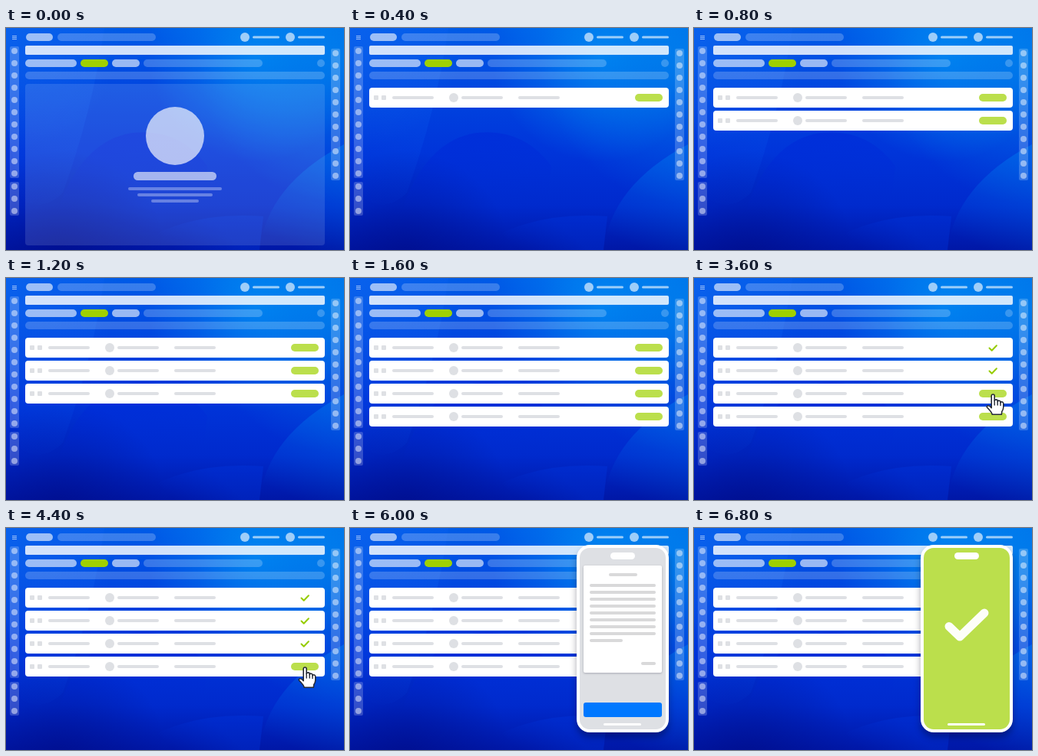
Recreate the animation shown at these times as an HTML page with a canvas. Size 440 px wide and 290 px high, loop 8.8 s.

```html
<!DOCTYPE html>
<html lang="en">
<head>
<meta charset="utf-8">
<style>
  html, body { margin: 0; width: 100%; height: 100%; overflow: hidden; background: #0034da; }
  canvas { display: block; width: 440px; height: 290px; }
</style>
</head>
<body>
<canvas id="stage" width="440" height="290"></canvas>
<script>
const stage = document.getElementById('stage');
const ctx = stage.getContext('2d');
const LOOP = 8800, STEP = 400;
const GREY = '#dee0e4', LIME = '#bbdf4c';
const white = a => `rgba(255,255,255,${a})`;

function box(x, y, w, h, r, fill, c = ctx) {
  c.fillStyle = fill;
  c.beginPath();
  c.roundRect(x, y, w, h, r);
  c.fill();
}
const pill = (x, y, w, h, fill, c) => box(x, y, w, h, h / 2, fill, c);

function dot(x, y, r, fill, c = ctx) {
  c.fillStyle = fill;
  c.beginPath();
  c.arc(x, y, r, 0, Math.PI * 2);
  c.fill();
}

function strokePath(d, color, width) {
  ctx.strokeStyle = color;
  ctx.lineWidth = width;
  ctx.lineCap = ctx.lineJoin = 'round';
  ctx.stroke(new Path2D(d));
}

function withShadow(blur, offset, alpha, draw) {
  ctx.save();
  ctx.shadowColor = `rgba(0,0,30,${alpha})`;
  ctx.shadowBlur = blur;
  ctx.shadowOffsetY = offset;
  draw();
  ctx.restore();
}

function paintWallpaper(c) {
  const base = c.createLinearGradient(0, 0, 0, 290);
  [[0, '#005be7'], [.3, '#0044df'], [.55, '#0035da'], [.8, '#002acd'], [1, '#0017a6']]
    .forEach(([at, color]) => base.addColorStop(at, color));
  c.fillStyle = base;
  c.fillRect(0, 0, 440, 290);

  const glow = (x, y, r, rgb, a) => {
    const g = c.createRadialGradient(x, y, 0, x, y, r);
    g.addColorStop(0, `rgba(${rgb},${a})`);
    g.addColorStop(1, `rgba(${rgb},0)`);
    c.fillStyle = g;
    c.fillRect(0, 0, 440, 290);
  };
  const sweep = (d, x0, y0, x1, y1, rgb, a) => {
    const g = c.createLinearGradient(x0, y0, x1, y1);
    g.addColorStop(0, `rgba(${rgb},${a})`);
    g.addColorStop(1, `rgba(${rgb},0)`);
    c.fillStyle = g;
    c.fill(new Path2D(d));
  };
  glow(0, 10, 150, '20,110,240', .4);
  glow(325, 35, 140, '0,155,248', .6);
  glow(440, 40, 190, '0,150,240', .55);
  glow(70, 300, 140, '0,8,125', .5);
  sweep('M128 0Q112 110 74 215Q50 240 20 225L0 120V0Z', 90, 60, 10, 230, '10,95,240', .3);
  sweep('M72 225Q105 145 165 137Q225 130 262 180L250 290H60Z', 150, 135, 160, 230, '0,35,215', .45);
  sweep('M440 152Q340 205 330 290H440Z', 430, 150, 370, 285, '0,125,240', .5);
  sweep('M160 290Q230 238 335 246L330 290Z', 260, 245, 220, 290, '0,55,225', .35);
}

function paintChrome(c) {
  for (const y of [10, 12, 14]) box(8, y, 6, 1, 0, white(.6), c);
  pill(26, 7, 35, 10, white(.6), c);
  pill(67, 7, 128, 10, white(.22), c);
  for (const x of [311, 370]) {
    dot(x, 12, 6, white(.62), c);
    pill(x + 10, 10.5, 35, 3, white(.62), c);
  }
  box(25, 23, 390, 12, 2, white(.82), c);
  pill(25, 41, 67, 10, white(.6), c);
  pill(97, 41, 36, 10, '#9fd000', c);
  pill(138, 41, 36, 10, white(.6), c);
  pill(179, 41, 155, 10, white(.22), c);
  dot(410, 46, 5, white(.22), c);
  pill(25, 57, 390, 10, white(.2), c);

  const rail = (x, y, count) => {
    box(x, y, 12, count * 16 - 4, 2, white(.2), c);
    for (let i = 0; i < count; i++) dot(x + 6, y + 6 + i * 16, 4, white(.48), c);
  };
  rail(5, 24, 11);
  rail(5, 201, 3);
  rail(423, 27, 11);
}

const backdrop = document.createElement('canvas');
backdrop.width = 440;
backdrop.height = 290;
paintWallpaper(backdrop.getContext('2d'));
paintChrome(backdrop.getContext('2d'));

function drawEmptyState() {
  box(25, 73, 390, 211, 4, white(.12));
  dot(220, 141, 38, white(.66));
  pill(166, 188, 108, 11, white(.6));
  [122, 98, 62].forEach((w, i) => pill(220 - w / 2, 208 + i * 8, w, 4, white(.32)));
}

function drawRow(index, done) {
  const y = 78 + index * 30;
  box(25, y, 390, 26, 4, '#fff');
  for (const x of [31, 41]) box(x, y + 10, 6, 6, 1, GREY);
  dot(135, y + 13, 6, GREY);
  for (const x of [55, 145, 219]) pill(x, y + 11, 54, 4, GREY);
  if (done) strokePath(`M384.5 ${y + 13.5}l3.2 3.2l6.2-6.4`, '#96cc00', 2);
  else pill(371, y + 8, 36, 10, LIME);
}

const HAND = new Path2D('M7.2 17V3.2Q7.2 1 9.2 1T11.2 3.2V9.5' +
  'Q11.4 7.8 13.3 7.9T15.2 9.8V10.6Q15.6 9 17.3 9.2T19 11.2V12' +
  'Q19.4 10.5 21 10.8T22.8 13V18Q22.6 21 20.8 23.5L20.3 27.3H8.3' +
  'Q7.6 24.5 4.7 21.5L1.5 18Q.7 16.5 2.3 15.9T5.6 17L7.2 18.6Z');

function drawHand(index) {
  ctx.save();
  ctx.translate(380, 91 + index * 30);
  ctx.fillStyle = '#fff';
  ctx.fill(HAND);
  ctx.strokeStyle = '#262b36';
  ctx.lineWidth = 1.6;
  ctx.lineJoin = 'round';
  ctx.stroke(HAND);
  strokePath('M11.2 9.5V15M15.2 10.6V15M19 12V15.5', '#262b36', 1.4);
  ctx.restore();
}

function drawPhone(approved) {
  withShadow(8, 6, .35, () => box(295, 22, 120, 245, 17, '#fff'));
  box(299, 26, 112, 237, 13, approved ? LIME : GREY);
  pill(339, 32, 32, 9, '#fff');
  pill(330, 255, 49, 3, '#fff');
  if (approved) {
    strokePath('M332 128.5L346 142L378 111', '#fdfef8', 11);
    return;
  }
  withShadow(3, 1, .25, () => box(304, 49, 102, 140, 2, '#fff'));
  const ink = '#d9d9da';
  pill(337, 59, 37, 4, ink);
  for (let i = 0; i < 9; i++) pill(312, 73 + i * 9, i < 8 ? 86 : 43, 4, ink);
  pill(379, 175, 19, 4, ink);
  box(304, 228, 102, 19, 3, '#0078ff');
}

function draw(time) {
  const step = Math.floor((time % LOOP) / STEP);
  ctx.drawImage(backdrop, 0, 0);
  if (step === 0) return drawEmptyState();

  // The hand reaches a new row every second step and confirms it one step later.
  const confirmed = Math.min(3, Math.max(0, Math.floor((step - 4) / 2)));
  for (let i = 0; i < Math.min(step, 4); i++) drawRow(i, i < confirmed);
  if (step >= 15) drawPhone(step >= 17);
  else if (step >= 5) drawHand(Math.min(3, Math.floor((step - 5) / 2)));
}

const start = performance.now();
function tick() {
  draw(performance.now() - start);
  requestAnimationFrame(tick);
}
tick();
</script>
</body>
</html>
```
